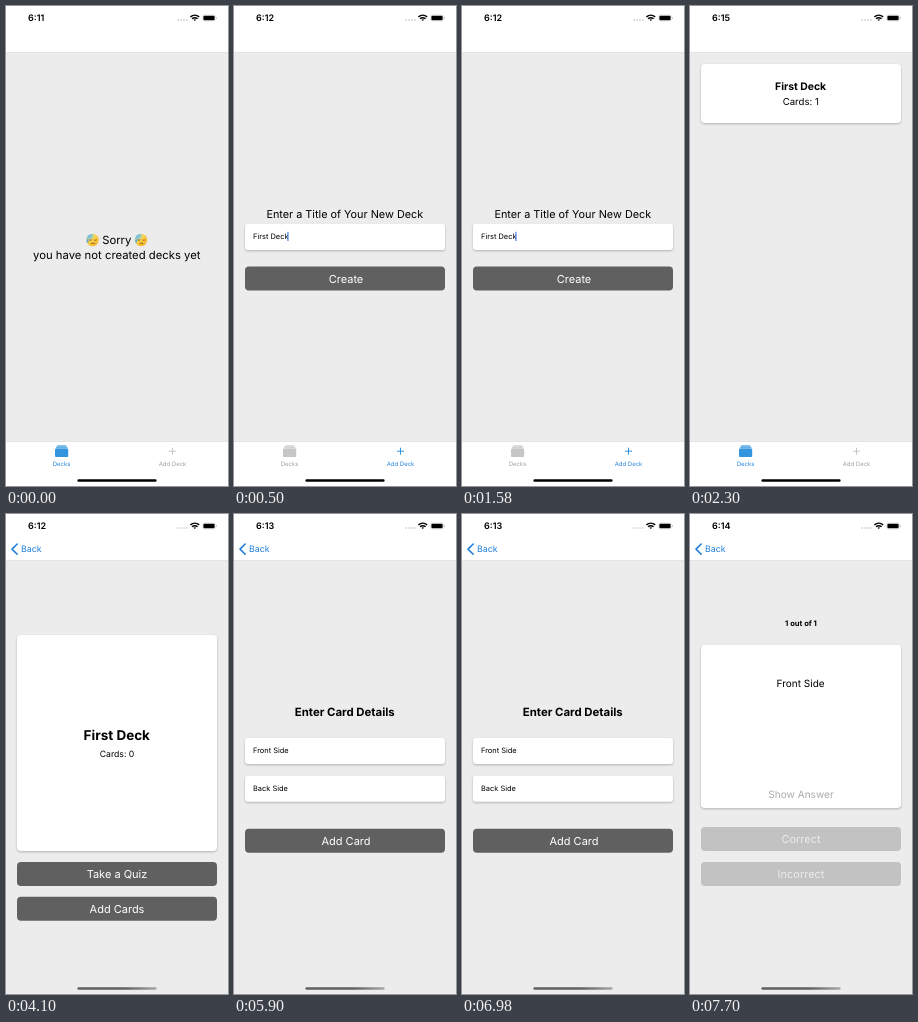
An HTML page that plays this animation: 222x480 px, repeating every 8 s.

```html
<!DOCTYPE html>
<html lang="en">
<head>
<meta charset="utf-8">
<title>Flashcards app</title>
<style>
html, body { margin: 0; width: 100%; height: 100%; overflow: hidden; background: #ececec; }
svg { display: block; width: 100vw; height: 100vh; font-family: Inter, "Liberation Sans", sans-serif; text-rendering: geometricPrecision; }
.screen { visibility: hidden; animation: 8s step-end infinite; }
#empty { animation-name: empty; }
#create { animation-name: create; }
#list { animation-name: list; }
#deck { animation-name: deck; }
#card { animation-name: card; }
#quiz { animation-name: quiz; }
@keyframes empty { 0% { visibility: visible } 6.25%, 100% { visibility: hidden } }
@keyframes create { 0% { visibility: hidden } 6.25% { visibility: visible } 28.75%, 100% { visibility: hidden } }
@keyframes list { 0% { visibility: hidden } 28.75% { visibility: visible } 51.25%, 100% { visibility: hidden } }
@keyframes deck { 0% { visibility: hidden } 51.25% { visibility: visible } 73.75%, 100% { visibility: hidden } }
@keyframes card { 0% { visibility: hidden } 73.75% { visibility: visible } 96.25%, 100% { visibility: hidden } }
@keyframes quiz { 0% { visibility: hidden } 96.25%, 100% { visibility: visible } }
.mid { text-anchor: middle; }
.bold { font-weight: 700; }
.time { font-size: 9px; font-weight: 600; }
.panel { fill: #fff; filter: drop-shadow(0 1px 1px rgba(0, 0, 0, .25)); }
.btn { fill: #606060; }
.label { font-size: 11px; fill: #fff; text-anchor: middle; }
.off .btn { fill: #c2c2c2; }
.off .label { fill: #ebebeb; }
.field { font-size: 7.45px; }
.tab { font-size: 6px; text-anchor: middle; fill: var(--text); }
.on { color: #3395de; --text: #2584d8; }
.idle { color: #c6c6c6; --text: #a0a0a0; }
</style>
</head>
<body>
<svg viewBox="0 0 222 480" preserveAspectRatio="none">
  <defs>
    <radialGradient id="face" cx=".2" cy=".12" r=".95">
      <stop offset="0" stop-color="#5fb4ea"/>
      <stop offset=".3" stop-color="#9fcbbd"/>
      <stop offset=".48" stop-color="#fbd64f"/>
      <stop offset="1" stop-color="#f5b52f"/>
    </radialGradient>
    <linearGradient id="dim">
      <stop offset=".6" stop-color="#606060"/>
      <stop offset="1" stop-color="#a8a8a8"/>
    </linearGradient>
    <g id="emoji">
      <circle r="6.2" fill="url(#face)"/>
      <g fill="none" stroke="#7a4d18" stroke-width=".8" stroke-linecap="round">
        <path d="M-3.2 0q1.1 1 2.2 0M1.6 0q1.1 1 2.2 0M-1.2 3.4q1.6-1 3.2 0"/>
      </g>
      <path d="M-4.9-1.2q2 3.2 0 4q-2-.8 0-4" fill="#4aa6ea"/>
    </g>
    <g id="back" fill="#1f7fdc">
      <path d="M11.2 30L6 35.1L11.2 40.2" fill="none" stroke="#1f7fdc" stroke-width="1.6" stroke-linecap="round" stroke-linejoin="round"/>
      <text x="15" y="38.2" font-size="8.9">Back</text>
    </g>
    <g id="bar">
      <rect y="435" width="222" height="45" fill="#fff"/>
      <rect y="435" width="222" height=".6" fill="#d2d2d2"/>
      <rect x="71.4" y="473.3" width="79.2" height="2.5" rx="1.25"/>
    </g>
    <rect id="home" x="71.4" y="473.3" width="79.2" height="2.5" rx="1.25" fill="url(#dim)"/>
    <g id="decks">
      <g fill="currentColor">
        <rect x="51" y="439" width="9.4" height="1.7" rx=".7" opacity=".6"/>
        <rect x="50" y="440.6" width="11.4" height="1.9" rx=".7" opacity=".75"/>
        <rect x="49" y="442.6" width="13.2" height="8.4" rx="1"/>
      </g>
      <text class="tab" x="55.5" y="459.8">Decks</text>
    </g>
    <g id="add">
      <path d="M163 445.2h7M166.5 441.7v7" stroke="currentColor"/>
      <text class="tab" x="166.5" y="459.8">Add Deck</text>
    </g>
    <rect id="button" class="btn" x="11" width="200" height="24" rx="4"/>
  </defs>

  <rect width="222" height="480" fill="#ececec"/>
  <rect width="222" height="46" fill="#fff"/>
  <rect y="46" width="222" height="1" fill="#e4e4e4"/>

  <g fill="#b8b8b8">
    <circle cx="172.2" cy="14" r=".8"/><circle cx="175.1" cy="14" r=".8"/>
    <circle cx="178" cy="14" r=".8"/><circle cx="180.9" cy="14" r=".8"/>
  </g>
  <g fill="none" stroke="#000" stroke-width="1.4">
    <path d="M184.4 10.9q4.4-3.6 8.8 0M186 12.8q2.8-2.2 5.6 0"/>
    <path d="M187.5 13.7q1.3-.9 2.6 0l-1.3 1.4z" fill="#000" stroke="none"/>
  </g>
  <rect x="196.7" y="9" width="12.6" height="6" rx="1.7" fill="none" stroke="#c4c4c4" stroke-width=".5"/>
  <rect x="197.4" y="9.7" width="11.2" height="4.6" rx="1"/>
  <rect x="210" y="11" width=".8" height="2" rx=".4" fill="#b0b0b0"/>

  <g id="empty" class="screen">
    <text class="time" x="22" y="15.2">6:11</text>
    <use href="#emoji" x="86.5" y="234"/>
    <use href="#emoji" x="135" y="234"/>
    <g class="mid" font-size="11.3">
      <text x="110.8" y="238">Sorry</text>
      <text x="110.8" y="253">you have not created decks yet</text>
    </g>
    <use href="#bar"/>
    <use href="#decks" class="on"/>
    <use href="#add" class="idle"/>
  </g>

  <g id="create" class="screen">
    <text class="time" x="22" y="15.2">6:12</text>
    <text class="mid" x="110.8" y="212" font-size="10.85">Enter a Title of Your New Deck</text>
    <rect class="panel" x="11" y="217.7" width="200" height="26.3" rx="3"/>
    <text class="field" x="19" y="232.7">First Deck</text>
    <rect x="53.4" y="225.8" width="1.1" height="9.2" fill="#3f78e0"/>
    <use href="#button" y="260.6"/>
    <text class="label" x="112" y="277">Create</text>
    <use href="#bar"/>
    <use href="#decks" class="idle"/>
    <use href="#add" class="on"/>
  </g>

  <g id="list" class="screen">
    <text class="time" x="22" y="15.2">6:15</text>
    <rect class="panel" x="11" y="58" width="200" height="59" rx="4"/>
    <text class="mid bold" x="110.6" y="84.3" font-size="10.4">First Deck</text>
    <text class="mid" x="110.8" y="98.7" font-size="9.6">Cards: 1</text>
    <use href="#bar"/>
    <use href="#decks" class="on"/>
    <use href="#add" class="idle"/>
  </g>

  <g id="deck" class="screen">
    <text class="time" x="22" y="15.2">6:12</text>
    <use href="#back"/>
    <rect class="panel" x="11" y="121" width="200" height="216" rx="4"/>
    <text class="mid bold" x="110.8" y="226" font-size="13.5">First Deck</text>
    <text class="mid" x="111" y="243" font-size="8.7">Cards: 0</text>
    <use href="#button" y="348"/>
    <text class="label" x="111" y="364">Take a Quiz</text>
    <use href="#button" y="382.8"/>
    <text class="label" x="111" y="399">Add Cards</text>
    <use href="#home"/>
  </g>

  <g id="card" class="screen">
    <text class="time" x="22" y="15.2">6:13</text>
    <use href="#back"/>
    <text class="mid bold" x="110.8" y="202" font-size="11.4">Enter Card Details</text>
    <rect class="panel" x="11" y="224" width="200" height="26" rx="3"/>
    <text class="field" x="19" y="239.2">Front Side</text>
    <rect class="panel" x="11" y="261.7" width="200" height="26" rx="3"/>
    <text class="field" x="19" y="276.6">Back Side</text>
    <use href="#button" y="314.8"/>
    <text class="label" x="112" y="331.2">Add Card</text>
    <use href="#home"/>
  </g>

  <g id="quiz" class="screen">
    <text class="time" x="22" y="15.2">6:14</text>
    <use href="#back"/>
    <text class="mid bold" x="111" y="112.3" font-size="7.6">1 out of 1</text>
    <rect class="panel" x="11" y="130.7" width="200" height="163.3" rx="4"/>
    <text class="mid" x="110.6" y="173" font-size="10">Front Side</text>
    <text class="mid" x="111" y="283.6" font-size="10.1" fill="#ababab">Show Answer</text>
    <g class="off">
      <rect class="btn" x="11" y="313" width="200" height="24" rx="4"/>
      <text class="label" x="111" y="329.3">Correct</text>
      <rect class="btn" x="11" y="348" width="200" height="24" rx="4"/>
      <text class="label" x="111" y="364.3">Incorrect</text>
    </g>
    <use href="#home"/>
  </g>
</svg>
</body>
</html>
```
